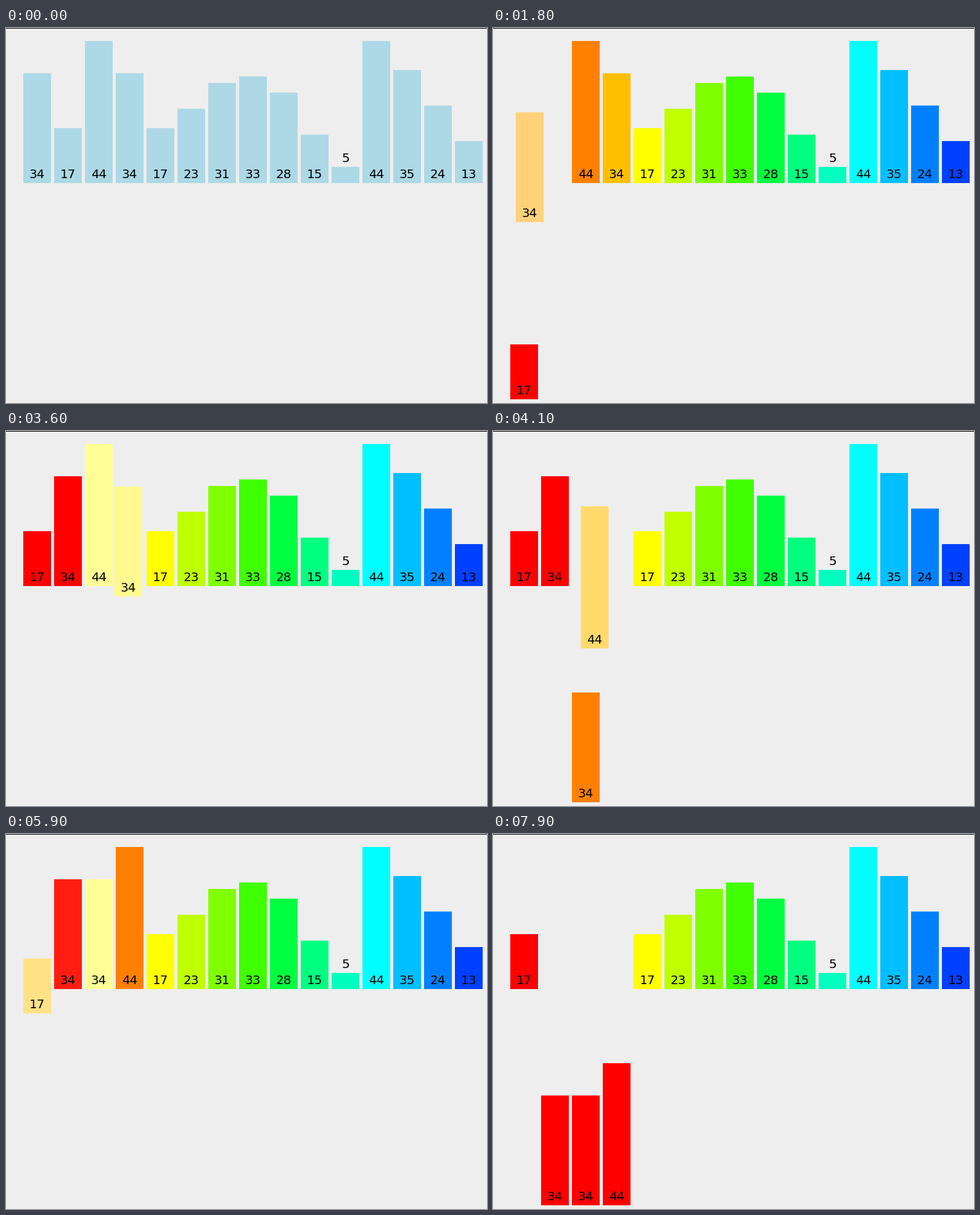
Recreate the animation shown at these times as a matplotlib script. Size 780 by 607 pixels, loop 8 s.

```python
import colorsys

import matplotlib.pyplot as plt
import numpy as np
from matplotlib.animation import FuncAnimation
from matplotlib.patches import Rectangle

WIDTH, HEIGHT, DPI = 780, 607, 100
FRAMES, INTERVAL = 80, 100
EASE_MS = 250

VALUES = [34, 17, 44, 34, 17, 23, 31, 33, 28, 15, 5, 44, 35, 24, 13]
LEFT, PITCH, BAR_WIDTH = 28, 50, 45
BASE, ROW_DROP = 251, 350
UNIT = 230 / max(VALUES)

PLAIN = np.array([173, 216, 230]) / 255
HIGHLIGHT = np.array([255, 255, 150]) / 255
# Hues advance by 15 degrees and skip pure green.
RAINBOW = [np.array(colorsys.hsv_to_rgb((i + (i > 7)) / 24, 1, 1))
           for i in range(len(VALUES))]
RED, ORANGE = RAINBOW[0], RAINBOW[2]


def paint(bar, color):
    return bar, color, None


def place(bar, slot, row, color=None):
    return bar, color, np.array([slot, row], float)


# Each step: start time in ms, then the changes that ease in together.
STEPS = [
    (375, [paint(i, c) for i, c in enumerate(RAINBOW)]),
    (805, [paint(0, HIGHLIGHT), paint(1, HIGHLIGHT)]),
    (1254, [place(1, 0, 1, RED)]),
    (1711, [place(0, 1, 1, RED)]),
    (2168, [place(1, 0, 0)]),
    (2625, [place(0, 1, 0)]),
    (3082, [paint(2, HIGHLIGHT), paint(3, HIGHLIGHT)]),
    (3543, [place(3, 2, 1, ORANGE)]),
    (3996, [place(2, 3, 1, ORANGE)]),
    (4453, [place(3, 2, 0)]),
    (4910, [place(2, 3, 0)]),
    (5367, [paint(1, HIGHLIGHT), paint(3, HIGHLIGHT)]),
    (5824, [place(1, 0, 1, RED), paint(0, HIGHLIGHT)]),
    (6285, [place(0, 1, 1, RED)]),
    (6743, [place(3, 2, 1, RED), paint(2, HIGHLIGHT)]),
    (7195, [place(2, 3, 1, RED)]),
    (7652, [place(1, 0, 0)]),
]


def ease(u):
    u = min(max(u, 0), 1)
    return 4 * u ** 3 if u < 0.5 else 1 - 4 * (1 - u) ** 3


def mix(a, b, t):
    return a + (b - a) * t


def bar_states(ms):
    spots = [np.array([i, 0.0]) for i in range(len(VALUES))]
    colors = [PLAIN] * len(VALUES)
    for start, changes in STEPS:
        if ms <= start:
            break
        t = ease((ms - start) / EASE_MS)
        for bar, color, spot in changes:
            if color is not None:
                colors[bar] = mix(colors[bar], color, t)
            if spot is not None:
                spots[bar] = mix(spots[bar], spot, t)
    return spots, colors


plt.rcParams["font.family"] = "DejaVu Sans"
fig = plt.figure(figsize=(WIDTH / DPI, HEIGHT / DPI), dpi=DPI,
                 facecolor="#eeeeee")
ax = fig.add_axes([0, 0, 1, 1])
ax.set_xlim(0, WIDTH)
ax.set_ylim(HEIGHT, 0)
ax.axis("off")
ax.add_patch(Rectangle((0, 0), WIDTH, 1, color="black", lw=0))

bars, labels = [], []
for i, value in enumerate(VALUES):
    bars.append(ax.add_patch(Rectangle((0, 0), BAR_WIDTH, value * UNIT,
                                       lw=0, snap=False, zorder=2 + i)))
    labels.append(ax.text(0, 0, str(value), fontsize=20 * 72 / DPI,
                          ha="center", va="baseline", zorder=2.5 + i))


def draw(frame):
    spots, colors = bar_states(frame * INTERVAL)
    for bar, label, value, (slot, row), color in zip(bars, labels, VALUES,
                                                     spots, colors):
        x, bottom = LEFT + PITCH * slot, BASE + ROW_DROP * row
        bar.set_xy((x, bottom - value * UNIT))
        bar.set_facecolor(np.clip(color, 0, 1))
        # Short bars carry their label above the top edge.
        lift = 8 if value * UNIT > 30 else value * UNIT + 8
        label.set_position((x + BAR_WIDTH / 2, bottom - lift))
    return bars + labels


anim = FuncAnimation(fig, draw, frames=FRAMES, interval=INTERVAL,
                     repeat=True, repeat_delay=0)
plt.show()
```
